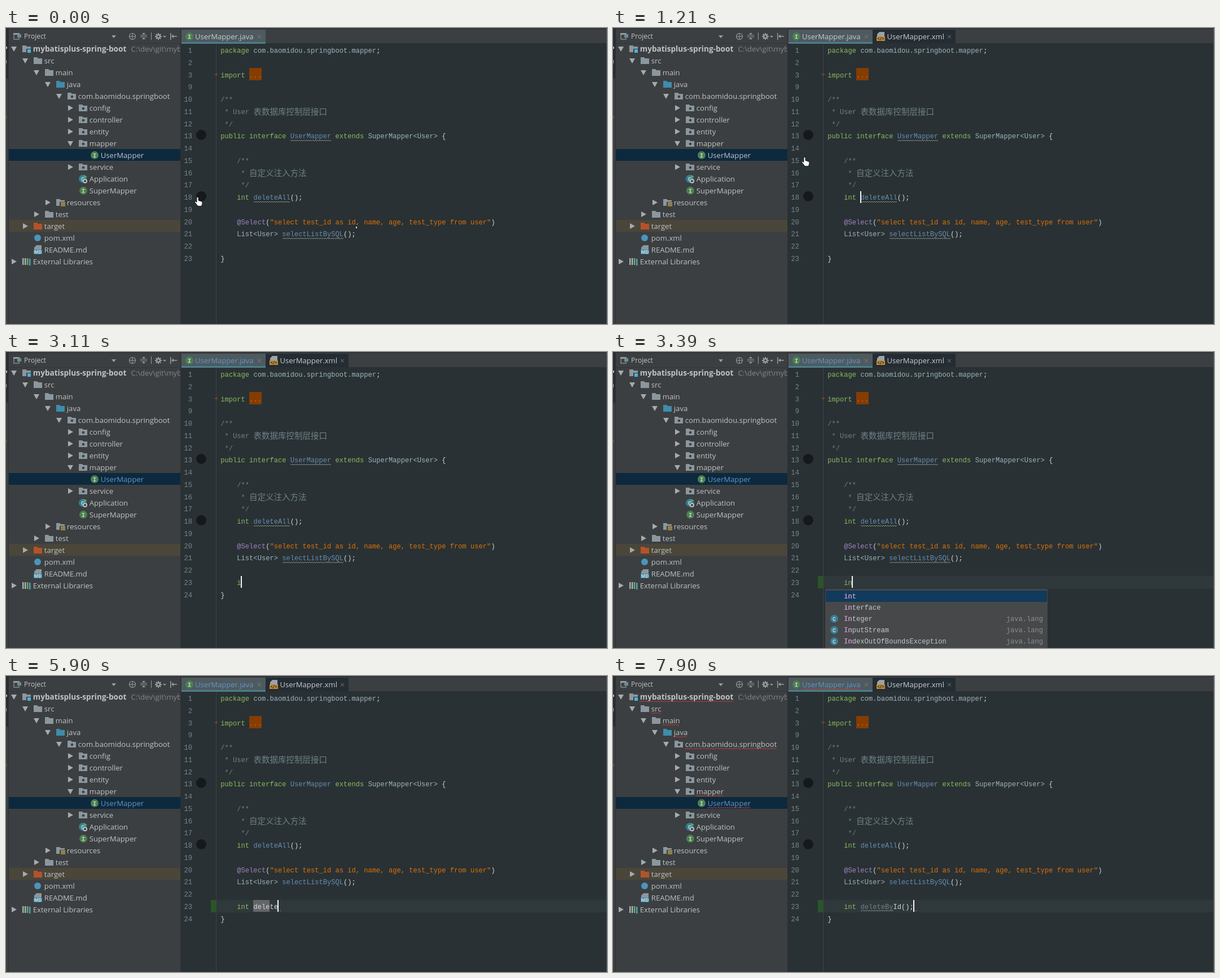
Write an HTML page with a canvas that moves like this. It is 1065x526 px and loops after 8 s.

```html
<!DOCTYPE html>
<html lang="en">
<head>
<meta charset="utf-8">
<title>Mapper navigation in an IDE</title>
<style>
html, body { margin: 0; width: 100%; height: 100%; overflow: hidden; background: #293134; }
canvas { display: block; width: 1065px; height: 526px; }
</style>
</head>
<body>
<canvas id="stage" width="1065" height="526"></canvas>
<script>
const g = document.getElementById('stage').getContext('2d');
const LOOP = 8000, CHAR = 7.26, LEFT = 380.3, ROW = 21.75;
const MONO = '12.1px "Liberation Mono", monospace';
const CJK = '14.5px "Noto Sans CJK SC", "Noto Sans CJK", sans-serif';
const UI = '"Open Sans", "Noto Sans", sans-serif';
const INK = { k: '#8aba5e', w: '#cfd5d8', s: '#de7006', c: '#708087', t: '#9fb3bd', b: '#678cb1', a: '#a082bd' };
const BLUE = '#6396c4', RED = '#bc413d', TOOL = '#959da1';

const rowY = r => 40 + r * ROW;
const rowTop = r => Math.floor(rowY(r) - 11);
const colX = n => LEFT + n * CHAR;
// Value of the last step whose time has passed.
const at = (t, steps) => steps.reduce((v, s) => t >= s[0] ? s[1] : v, steps[0][1]);

function rect(x, y, w, h, color) { g.fillStyle = color; g.fillRect(x, y, w, h); }
function disc(x, y, r, color) {
  g.fillStyle = color; g.beginPath(); g.arc(x, y, r, 0, 7); g.fill();
}
function poly(points, fill, stroke, width = 1) {
  g.beginPath();
  points.forEach(p => g.lineTo(...p));
  if (fill) { g.closePath(); g.fillStyle = fill; g.fill(); }
  if (stroke) { g.strokeStyle = stroke; g.lineWidth = width; g.stroke(); }
}
function text(str, x, y, color, font, align = 'left') {
  g.font = font; g.fillStyle = color; g.textAlign = align;
  g.fillText(str, x, y);
}
function wave(x1, x2, y, color) {
  const pts = [];
  for (let x = x1, i = 0; x <= x2; x += 2, i++) pts.push([x, y + (i % 2 ? 1 : -1)]);
  poly(pts, null, color);
}
// Coloured runs: each "~" is followed by an ink key, then its text.
function code(r, col, runs) {
  let x = colX(col);
  for (const run of runs.split('~').slice(1)) {
    const str = run.slice(1), wide = /[\u4e00-\u9fff]/.test(str);
    text(str, x, rowY(r) + (wide ? 5.5 : 4), INK[run[0]], wide ? CJK : MONO);
    x += str.length * (wide ? 14.5 : CHAR);
  }
}
function lineNumbers(list) {
  list.forEach((n, r) => text(n, 330, rowY(r) + 4, '#78858a', MONO, 'right'));
}

function folder(x, y, color, mark) {
  poly([[x, y - 6], [x + 6, y - 6], [x + 8, y - 4], [x + 15, y - 4], [x + 15, y + 6], [x, y + 6]], color);
  if (mark === 'package') disc(x + 8, y + 1, 2.3, '#3c3f41');
  if (mark === 'module') { rect(x + 7, y, 9, 8, '#3c3f41'); rect(x + 9, y + 1, 6, 6, '#40b6e0'); }
  if (mark === 'resources') {
    rect(x + 6, y - 1, 10, 9, '#3c3f41');
    for (let i = 0; i < 3; i++) rect(x + 8, y + i * 2.5, 8, 1.5, '#d0a84c');
  }
}
function badge(x, y, letter, color) {
  disc(x, y, 7, color);
  text(letter, x, y + 4, '#c9d6cb', 'bold 10px "Liberation Mono", monospace', 'center');
}
const GRAY = '#8b979f';
const ICONS = {
  module: (x, y) => folder(x, y, GRAY, 'module'),
  folder: (x, y) => folder(x, y, GRAY),
  source: (x, y) => folder(x, y, '#3f8cac'),
  package: (x, y) => folder(x, y, GRAY, 'package'),
  resources: (x, y) => folder(x, y, GRAY, 'resources'),
  excluded: (x, y) => folder(x, y, '#b4532b'),
  interface: (x, y) => badge(x + 8, y, 'I', '#4c8050'),
  app(x, y) {
    badge(x + 7, y, 'C', '#347f98');
    poly([[x + 9, y - 7], [x + 15, y - 4], [x + 9, y - 1]], '#59a860');
    disc(x + 11, y + 4, 4, '#b9c0c4'); disc(x + 11, y + 4, 2, '#3c3f41');
  },
  build: (x, y) => disc(x + 7, y, 6, '#4a94bd'),
  markdown(x, y) {
    poly([[x + 5, y - 8], [x + 14, y - 8], [x + 14, y], [x + 1, y], [x + 1, y - 4]], GRAY);
    rect(x, y, 15, 8, '#3c86a2');
    text('MD', x + 7.5, y + 7, '#dbe6ea', 'bold 8px ' + UI, 'center');
  },
  libraries(x, y) {
    ['#a7b1b6', '#a7b1b6', '#6cab65', '#4aa1c0'].forEach((c, i) => rect(x + i * 4, y - 6 + (i === 3), 2.5, 12, c));
  }
};
// depth, arrow (v open, > closed), icon, label
const TREE = [
  [0, 'v', 'module', 'mybatisplus-spring-boot'], [1, 'v', 'folder', 'src'], [2, 'v', 'folder', 'main'],
  [3, 'v', 'source', 'java'], [4, 'v', 'package', 'com.baomidou.springboot'],
  [5, '>', 'package', 'config'], [5, '>', 'package', 'controller'], [5, '>', 'package', 'entity'],
  [5, 'v', 'package', 'mapper'], [6, '', 'interface', 'UserMapper'], [5, '>', 'package', 'service'],
  [5, '', 'app', 'Application'], [5, '', 'interface', 'SuperMapper'], [3, '>', 'resources', 'resources'],
  [2, '>', 'folder', 'test'], [1, '>', 'excluded', 'target'], [1, '', 'build', 'pom.xml'],
  [1, '', 'markdown', 'README.md'], [0, '>', 'libraries', 'External Libraries']
];
const BROKEN = [0, 1, 2, 3, 4, 8, 9];

function triangle(x, y, open, color) {
  poly(open ? [[x - 5, y - 4], [x + 5, y - 4], [x, y + 5]] : [[x - 4, y - 5], [x + 5, y], [x - 4, y + 5]], color);
}

function toolbar() {
  g.strokeStyle = TOOL; g.lineWidth = 1.2;
  g.strokeRect(14, 10, 9, 10);
  rect(13, 9, 11, 3, TOOL); rect(20, 11, 7, 6, '#6f8a96');
  text('Project', 32, 19, '#bfc4c6', '12px ' + UI);
  poly([[187, 13], [195, 13], [191, 18]], TOOL);
  g.beginPath(); g.arc(224, 15, 5.5, 0, 7); g.stroke();
  poly([[218, 15], [230, 15]], null, TOOL); poly([[224, 9], [224, 21]], null, TOOL);
  poly([[238, 13], [250, 13]], null, TOOL); poly([[238, 16], [250, 16]], null, TOOL);
  poly([[241, 9], [247, 9], [244, 12]], TOOL); poly([[241, 20], [247, 20], [244, 17]], TOOL);
  rect(257, 8, 1, 13, TOOL);
  for (let i = 0; i < 4; i++) {
    const a = i * Math.PI / 4, c = 6 * Math.cos(a), s = 6 * Math.sin(a);
    poly([[270 - c, 15 - s], [270 + c, 15 + s]], null, TOOL, 2);
  }
  disc(270, 15, 4, TOOL); disc(270, 15, 1.8, '#3c3f41');
  poly([[278, 14], [284, 14], [281, 17]], TOOL);
  rect(291, 9, 1.5, 12, TOOL); rect(296, 14, 7, 1.5, TOOL);
  poly([[293, 14.7], [297, 11.5], [297, 18]], TOOL);
}

function sidebar(t) {
  rect(0, 0, 310, 526, '#3c3f41');
  rect(0, 0, 4, 90, '#2b2e30');
  rect(0, 33, 2, 4, '#a9b0b3'); rect(0, 57, 1, 6, '#a9b0b3'); rect(0, 156, 1, 5, '#b04a42');
  rect(4, 0, 1, 526, '#2d3032');
  rect(5, 0, 305, 2, '#303436');
  rect(5, 27, 305, 1, '#333638');
  toolbar();

  rect(5, 215, 305, 21, '#0d293e');
  rect(5, 341, 305, 21, '#4a463a');
  TREE.forEach(([depth, arrow, icon, label], i) => {
    const x = 14 + depth * 20, y = 37 + i * 21;
    if (arrow) triangle(x, y, arrow === 'v', '#a5abae');
    ICONS[icon](x + 15, y);
    const color = i === 9 && t >= 2960 ? BLUE : '#bfc3c5';
    const font = (i ? '13.1px ' : 'bold 13.6px ') + UI;
    text(label, x + 33.8, y + 5, color, font);
    if (t >= 6800 && BROKEN.includes(i)) wave(x + 33, x + 34 + g.measureText(label).width, y + 8, RED);
  });
  g.save();
  g.beginPath(); g.rect(0, 0, 309, 60); g.clip();
  text('C:\\dev\\git\\mybatisplus-spring-boot', 221.5, 42, '#838789', '13.1px ' + UI);
  g.restore();
}

function tab(x, w, active, label, labelX, color) {
  rect(x, 3, w, 24, active ? '#4e5a5f' : '#242d33');
  if (active) rect(x, 25, w, 3, '#4a7f8c');
  text(label, labelX, 20, color, '13px ' + UI);
  const cx = x + w - 11;
  poly([[cx - 3, 12.5], [cx + 3, 18.5]], null, '#7d8588'); poly([[cx - 3, 18.5], [cx + 3, 12.5]], null, '#7d8588');
}

function tabs(t, xmlView) {
  rect(310, 0, 755, 28, '#3c3f41');
  rect(310, 0, 755, 2, '#303436');
  rect(310, 27, 755, 1, '#2a2e30');
  tab(311, 149, !xmlView, 'UserMapper.java', 335, t >= 2810 ? BLUE : '#c9cdcf');
  badge(325, 15, 'I', '#4c8050');
  if (t >= 6800) wave(335, 438, 23, RED);
  if (t < 300) return;
  const loading = t < 420;
  tab(460, loading ? 151 : 147, xmlView, 'UserMapper.xml', loading ? 489 : 485.5, '#c9cdcf');
  if (loading) return;
  poly([[472, 7], [481, 7], [481, 15], [468, 15], [468, 11]], '#9aa3a7');
  rect(467, 15, 15, 8, '#c58a35');
  text('</>', 474.5, 22, '#2b2b2b', 'bold 8px ' + UI, 'center');
}

function xmlEditor() {
  const block = (r, x, w) => rect(x, rowTop(r), w, rowTop(r + 1) - rowTop(r), '#514d37');
  for (const [r, x] of [[5, 605], [9, 576]]) {
    block(r, x, 1064 - x);
    block(r + 1, 380, 684);
    block(r + 2, 380, 30);
  }
  lineNumbers([1, 2, 3, 4, 5, 6, 7, 8, 9, 10, 11, 12, 13]);
  code(0, 0, '~w<?xml version=~s"1.0"~w encoding=~s"UTF-8"~w?>');
  code(1, 0, '~k<!DOCTYPE mapper PUBLIC ~s"-//mybatis.org//DTD Mapper 3.0//EN" "http://mybatis.org/dtd/mybatis-3-mapper.dtd"');
  code(2, 0, '~k<mapper ~wnamespace=~s"com.baomidou.springboot.mapper.UserMapper"~k>');
  wave(547, 606, 91, '#5f8a4a'); wave(613, 685, 91, '#5f8a4a');
  code(4, 4, '~c<!-- ~c通用查询结果列~c -->');
  code(5, 4, '~k<sql ~wid=~s"Base_Column_List"~k>');
  code(6, 8, '~wtest_id ~kAS~w testId, ~kname~w, age, test_type ~kAS~w testType, role, phone');
  code(7, 4, '~k</sql>');
  code(9, 4, '~k<delete ~wid=~s"deleteAll"~k>');
  code(10, 8, '~kDELETE FROM USER');
  code(11, 4, '~k</delete>');
  code(12, 0, '~k</mapper>');
  disc(346, 234, 9, '#15191b');
}

const TYPED = [
  [0, ''], [3110, 'i'], [3230, 'in'], [3540, 'int'], [3810, 'int '], [4080, 'int d'], [4210, 'int de'],
  [4360, 'int del'], [4520, 'int dele'], [4660, 'int delet'], [4780, 'int delete'], [4940, 'int deleteB'],
  [5470, 'int delete'], [6020, 'int deleteB'], [6280, 'int deleteBy'], [6680, 'int deleteByI'],
  [7100, 'int deleteById'], [7510, 'int deleteById('], [7630, 'int deleteById()'], [7900, 'int deleteById();']
];

function caret(col, r) { rect(Math.floor(colX(col)), rowTop(r), 2, 21, '#f4f6f6'); }

function popup(t) {
  const more = t >= 3540 ? ['InternalError', 'InterruptedException'] : ['InputStream', 'IndexOutOfBoundsException'];
  const items = ['int', 'interface', 'Integer', ...more];
  const matched = t >= 3540 ? 3 : t >= 3390 ? 2 : 1;
  rect(376, 421, 394, 105, '#46484a');
  items.forEach((word, i) => {
    const y = 424 + i * 20;
    if (!i) rect(377, y, 392, 20, '#113a5c');
    text(word, 409.3, y + 14, '#c3c7c9', MONO);
    text(word.slice(0, matched), 409.3, y + 14, '#d08ad0', MONO);
    if (i > 1) { badge(392, y + 10, 'C', '#347f98'); text('java.lang', 762, y + 14, '#8a8f91', MONO, 'right'); }
  });
}

function javaEditor(t) {
  const inserted = t >= 2810, typed = at(t, TYPED);
  if (t >= 3230) {
    rect(373, rowTop(17), 691, 22, '#2f393c');
    rect(363, rowTop(17), 9, 22, '#2b5527');
  }
  lineNumbers([1, 2, 3, 9, 10, 11, 12, 13, 14, 15, 16, 17, 18, 19, 20, 21, 22, 23].concat(inserted ? 24 : []));
  disc(346, 190, 9, '#15191b'); disc(346, 299, 9, '#15191b');

  code(0, 0, '~kpackage~t com.baomidou.springboot.mapper~w;');
  text('+', 369, 87, '#9a5220', MONO);
  rect(431, 71, 22, 22, '#853c00');
  code(2, 0, '~kimport ~s...');
  code(4, 0, '~c/**');
  code(5, 0, '~c * User ~c表数据库控制层接口');
  code(6, 0, '~c */');
  code(7, 0, '~kpublic interface ~bUserMapper ~kextends ~tSuperMapper<User> ~w{');
  code(9, 4, '~c/**');
  code(10, 4, '~c * ~c自定义注入方法');
  code(11, 4, '~c */');
  if (t >= 1580 && t < 2250) rect(438, rowTop(12), 66, 21, '#5d6062');
  code(12, 4, '~kint ~bdeleteAll~w();');
  code(14, 4, '~a@Select~w(~s"select test_id as id, name, age, test_type from user"~w)');
  code(15, 4, '~tList<User> ~bselectListBySQL~w();');
  code(inserted ? 18 : 17, 0, '~w}');
  if (t < 5900) {
    wave(504, 576, 200, '#868f84'); wave(439, 504, 309, '#868f84'); wave(490, 598, 374, '#868f84');
  }
  if (t < 300) rect(620, 353, 2, 3, '#d5dadb');
  if (t >= 1210 && t < 1850) caret(8, 12);
  if (t >= 1850 && !inserted) caret(4, 16);
  if (!inserted) return;

  const word = typed.slice(4), dim = t >= 7630;
  const marked = t < 4520 ? 0 : t < 6800 ? 4 : 8;
  if (marked && !dim) rect(438, rowTop(17), Math.round(marked * CHAR), 21, '#636567');
  code(17, 4, '~k' + typed.slice(0, 4) + (dim ? '~c' + word.slice(0, 8) + '~w' + word.slice(8) : '~w' + word));
  if (dim) wave(439, 497, 417, '#7e8486');
  const end = 4 + typed.length;
  if (t >= 4660) wave(colX(end) + 2, colX(end) + 6, 417, RED);
  caret(end, 17);
  if (t >= 3230 && t < 3810) popup(t);
}

const HAND = [[0, 1], [1.5, 0], [3, 1], [3, 6], [8, 7.5], [10, 9], [9.5, 13], [8, 16], [2, 16], [-1, 12], [-3.5, 9], [-2.5, 7.5], [0, 9]];
const ARROW = [[0, 0], [0, 12], [2.6, 9.6], [4.6, 14], [6.6, 13], [4.7, 9], [8.2, 9]];

function pointer(t) {
  if (t >= 2810) return;
  const shape = (pts, x, y) => poly([...pts, pts[0]].map(p => [p[0] + x, p[1] + y]), '#fff', '#111', 0.8);
  if (t < 150) return shape(HAND, 338, 300.5);
  if (t < 930) {
    const k = at(t, [[0, 0], [690, 1], [810, 2]]) / 3;
    return shape(ARROW, 337 + 3 * k, 299 - 70 * k);
  }
  if (t < 1330) return shape(HAND, 338, 229.5);
  const k = at(t, [[1330, 0.25], [1460, 0.6], [1580, 0.9], [1710, 1]]);
  const x = 340 + 514 * k, y = 236 + 150 * k;
  poly([[x - 3, y - 8], [x + 3, y - 8]], null, '#e4e7e8');
  poly([[x, y - 8], [x, y + 8]], null, '#e4e7e8');
  poly([[x - 3, y + 8], [x + 3, y + 8]], null, '#e4e7e8');
}

function draw() {
  const t = performance.now() % LOOP;
  const xmlView = t >= 300 && t < 1210;
  rect(0, 0, 1065, 526, '#293134');
  rect(372, 28, 1, 498, '#394447');
  if (xmlView) xmlEditor(); else javaEditor(t);
  tabs(t, xmlView);
  sidebar(t);
  rect(309, 0, 1, 526, '#2c3032');
  rect(1064, 0, 1, 526, '#565a5c');
  pointer(t);
  requestAnimationFrame(draw);
}
draw();
</script>
</body>
</html>
```
